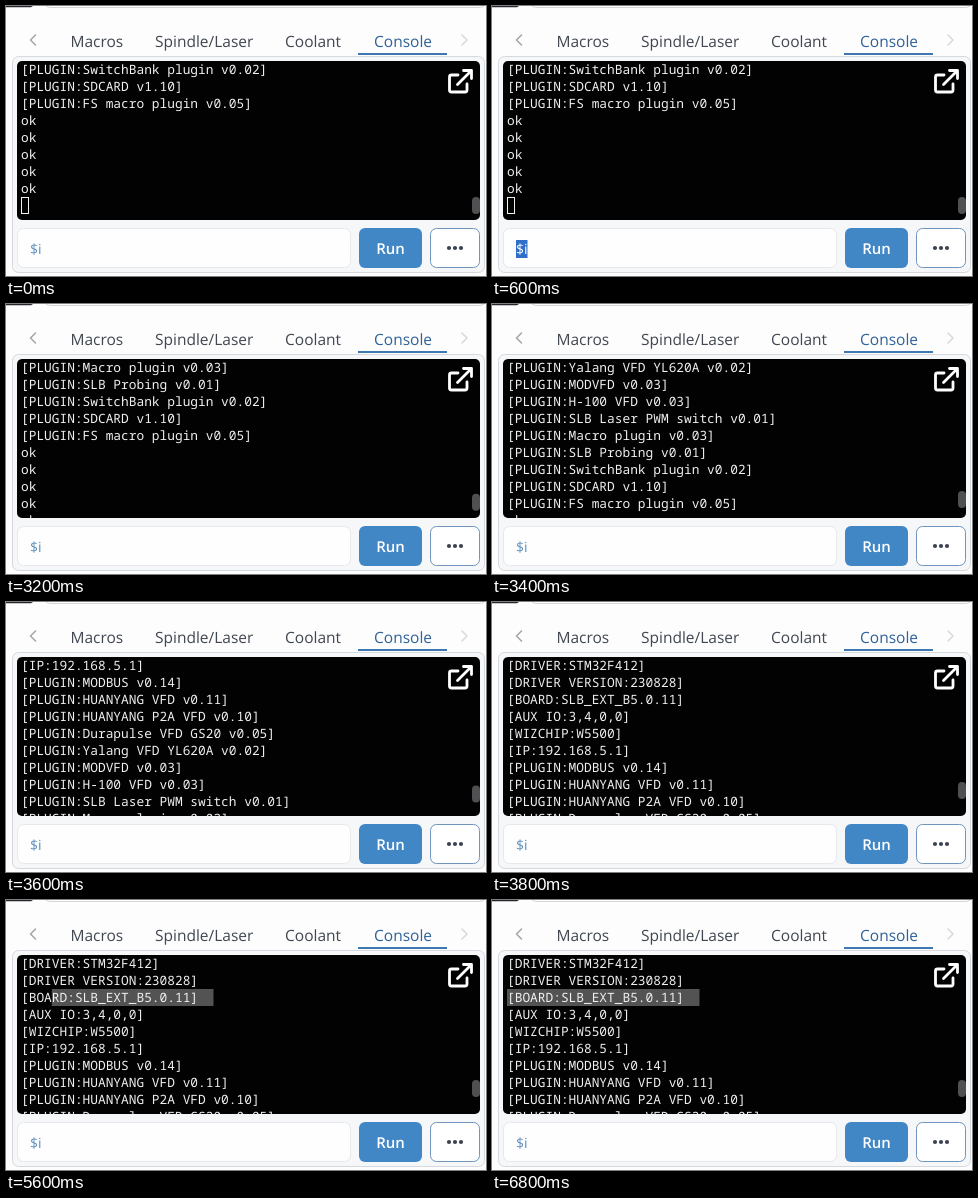
An HTML page for the animation above (7 s loop, 480x270 px).

```html
<!DOCTYPE html>
<html lang="en">
<head>
<meta charset="utf-8">
<title>Console</title>
<style>
  html, body { margin: 0; width: 100%; height: 100%; overflow: hidden; background: #fdfdfe; }
  svg { display: block; width: 480px; height: 270px; text-rendering: geometricPrecision; }
  text { font-family: "Open Sans", "Noto Sans", sans-serif; white-space: pre; }
  .tab { font-size: 15.5px; fill: #414750; }
  .tab.on { fill: #2f6298; }
  .term text { font: 12.833px "Noto Sans Mono", "DejaVu Sans Mono", monospace; fill: #f0f0f0; }
  .line { fill: none; stroke-linecap: round; stroke-linejoin: round; }
</style>
</head>
<body>
<svg viewBox="0 0 480 270">
  <defs>
    <clipPath id="view"><rect x="11" y="55" width="463" height="159" rx="5"/></clipPath>
  </defs>

  <path d="M0 0H27L25 1.2H0Z" fill="#25262b"/>
  <path d="M40 0Q42 1.5 45 1.5H473Q476 1.5 478 0" fill="none" stroke="#d3d5d9"/>

  <path class="line" d="M29.5 29L24.5 34L29.5 39" stroke="#a2a4a8" stroke-width="1.5"/>
  <path class="line" d="M456 29L461 34L456 39" stroke="#d6d8dc" stroke-width="1.5"/>
  <text class="tab" x="64.5" y="41">Macros</text>
  <text class="tab" x="149" y="41">Spindle/Laser</text>
  <text class="tab" x="279" y="41">Coolant</text>
  <text class="tab on" x="368" y="41">Console</text>
  <rect x="352" y="47" width="89" height="2" fill="#3f78b0"/>

  <rect x="6.5" y="50.5" width="472" height="216" rx="6" fill="#f6f7f9" stroke="#d5d8dd"/>
  <rect x="11" y="55" width="463" height="159" rx="5" fill="#020203"/>
  <g class="term" clip-path="url(#view)">
    <rect id="mark" y="89" height="17" fill="#535353"/>
    <g id="lines"></g>
    <rect id="thumb" x="466" width="8" height="17" rx="4" fill="#505052"/>
  </g>
  <g class="line" stroke="#fff" stroke-width="2.8">
    <path d="M452 69H445.5Q443.5 69 443.5 71V84Q443.5 86 445.5 86H459Q461 86 461 84V78"/>
    <path d="M451.5 78.5L464 66M457.5 64.5H465.5V72.5"/>
  </g>

  <rect x="11.5" y="222.5" width="333" height="39" rx="6" fill="#fefefe" stroke="#e6e8ec"/>
  <rect id="pick" x="24" y="234" width="11.5" height="18" fill="#2f6fc9"/>
  <text id="cmd" x="24" y="248" font-size="14">$i</text>
  <rect id="caret" x="35" y="233" width="1" height="18" fill="#3d6f9f"/>

  <rect x="353" y="222" width="63" height="40" rx="6" fill="#4186c5"/>
  <text x="384.5" y="248" font-size="15" font-weight="600" fill="#fff" text-anchor="middle">Run</text>
  <rect x="424.5" y="222.5" width="49" height="39" rx="6" fill="#fff" stroke="#6f95bc"/>
  <g fill="#3b4350">
    <circle cx="443" cy="242" r="2.1"/><circle cx="449" cy="242" r="2.1"/><circle cx="455" cy="242" r="2.1"/>
  </g>
</svg>
<script>
  const LOOP = 7000, ROW = 17, CELL = 7.7, LEFT = 15, TOP = 55;
  const rows = [
    "DRIVER:STM32F412", "DRIVER VERSION:230828", "BOARD:SLB_EXT_B5.0.11",
    "AUX IO:3,4,0,0", "WIZCHIP:W5500", "IP:192.168.5.1",
    "PLUGIN:MODBUS v0.14", "PLUGIN:HUANYANG VFD v0.11", "PLUGIN:HUANYANG P2A VFD v0.10",
    "PLUGIN:Durapulse VFD GS20 v0.05", "PLUGIN:Yalang VFD YL620A v0.02",
    "PLUGIN:MODVFD v0.03", "PLUGIN:H-100 VFD v0.03", "PLUGIN:SLB Laser PWM switch v0.01",
    "PLUGIN:Macro plugin v0.03", "PLUGIN:SLB Probing v0.01", "PLUGIN:SwitchBank plugin v0.02",
    "PLUGIN:SDCARD v1.10", "PLUGIN:FS macro plugin v0.05"
  ].map(s => `[${s}]`).concat(Array(5).fill("ok"));

  // [time, value] steps; each value holds until the next time
  const topRow = [[0, 16], [3200, 14], [3400, 10], [3600, 5], [3800, 0]];
  const markFrom = [[0, 25], [4600, 22], [4800, 17], [5000, 13], [5200, 9],
    [5400, 7], [5600, 4], [5800, 2], [6000, 1], [6200, 0]];
  const field = [[0, "plain"], [200, "caret"], [600, "picked"], [2800, "plain"]];
  const focus = [[0, false], [2800, true]];
  const at = (steps, t) => steps.findLast(s => s[0] <= t)[1];

  const $ = id => document.getElementById(id);
  function add(tag, attrs, text = "") {
    const el = document.createElementNS("http://www.w3.org/2000/svg", tag);
    for (const k in attrs) el.setAttribute(k, attrs[k]);
    el.textContent = text;
    return $("lines").appendChild(el);
  }
  rows.forEach((s, i) => add("text", { x: LEFT, y: TOP + 13 + i * ROW }, s));
  const cursor = add("rect", {
    x: LEFT + .5, y: TOP + rows.length * ROW + .5, width: 7, height: 16, stroke: "#f0f0f0"
  });
  const show = (id, on) => $(id).setAttribute("visibility", on ? "visible" : "hidden");

  function draw(t) {
    const top = at(topRow, t), from = at(markFrom, t), mode = at(field, t);
    $("lines").setAttribute("transform", `translate(0 ${-top * ROW})`);
    $("thumb").setAttribute("y", 180 + top * 11 / 16);
    $("mark").setAttribute("x", LEFT + from * CELL);
    $("mark").setAttribute("width", (25 - from) * CELL);
    cursor.setAttribute("fill", at(focus, t) ? "#f0f0f0" : "none");
    show("caret", mode === "caret");
    show("pick", mode === "picked");
    $("cmd").setAttribute("fill", mode === "picked" ? "#fff" : "#5d8fbe");
  }

  const start = performance.now();
  function tick() {
    draw((performance.now() - start) % LOOP);
    requestAnimationFrame(tick);
  }
  tick();
</script>
</body>
</html>
```
